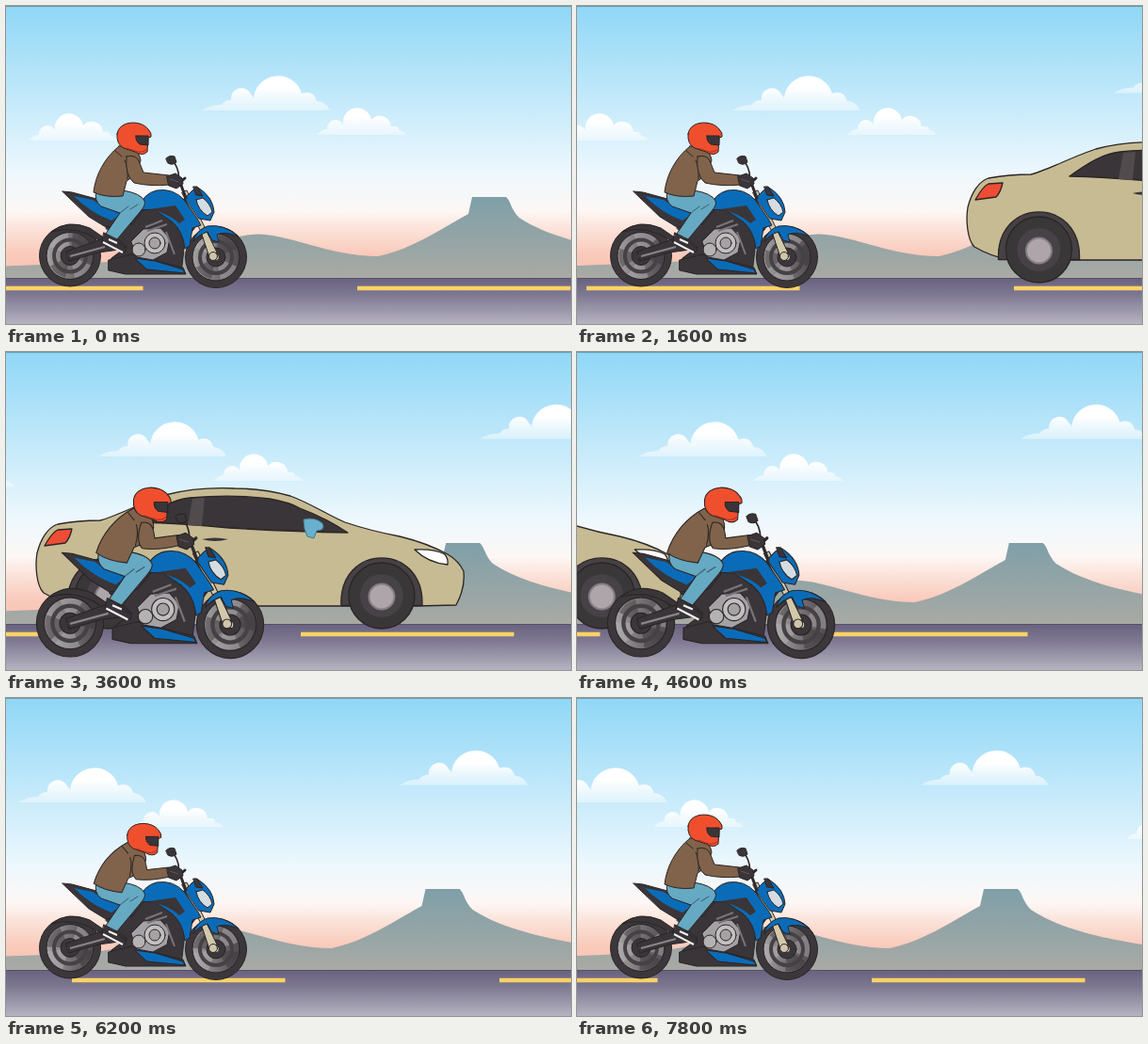
Write an HTML page that moves like this. It is 600 px wide and 338 px high and loops after 8 s.

```html
<!DOCTYPE html>
<html lang="en">
<head>
<meta charset="utf-8">
<title>Overtaking</title>
<style>
html, body { margin: 0; width: 100%; height: 100%; overflow: hidden; }
svg { display: block; width: 100vw; height: 100vh; }
.ln { stroke: #2b2526; stroke-width: 1; stroke-linejoin: round; stroke-linecap: round; }
#car .ln { stroke-width: 1.3; }
.dk { fill: #3a3538; }
.bl { fill: #0a6cb9; }
.gy { fill: #a5a2a5; }
.br { fill: #80634a; }
.no { fill: none; }
</style>
</head>
<body>
<svg viewBox="0 0 600 338" preserveAspectRatio="none">
<defs>
  <linearGradient id="sky" x2="0" y2="1">
    <stop offset="0" stop-color="#8fd7f6"/>
    <stop offset=".3" stop-color="#bde7fa"/>
    <stop offset=".62" stop-color="#eef8fd"/>
    <stop offset=".75" stop-color="#fdf7f5"/>
    <stop offset=".83" stop-color="#fbdfd5"/>
    <stop offset=".91" stop-color="#f9cabb"/>
    <stop offset="1" stop-color="#f8c0af"/>
  </linearGradient>
  <linearGradient id="hill" gradientUnits="userSpaceOnUse" x1="0" y1="203" x2="0" y2="290">
    <stop offset="0" stop-color="#7f9fa8"/>
    <stop offset="1" stop-color="#a9aaa4"/>
  </linearGradient>
  <linearGradient id="road" x2="0" y2="1">
    <stop offset="0" stop-color="#69627f"/>
    <stop offset=".35" stop-color="#7d7891"/>
    <stop offset="1" stop-color="#b7b4c2"/>
  </linearGradient>
  <linearGradient id="puff" x2="0" y2="1">
    <stop offset=".35" stop-color="#fff"/>
    <stop offset="1" stop-color="#fff" stop-opacity=".4"/>
  </linearGradient>
  <linearGradient id="rim">
    <stop offset="0" stop-color="#a3a0a2"/>
    <stop offset=".6" stop-color="#6d696c"/>
    <stop offset="1" stop-color="#4f4b4e"/>
  </linearGradient>
  <path id="big" fill="url(#puff)" d="M-81 38Q-72 32-60 32Q-57 27-50 27A11 11 0 0 1-29 21Q-27 22-26 25A26 25.500 0 0 1 25 20Q38 16 41 28Q50 28 55 38Z"/>
  <path id="small" fill="url(#puff)" d="M-43 26Q-38 20-32 20A9 9 0 0 1-15 15A15 15 0 0 1 15 10A12 12 0 0 1 36 17Q44 16 44 21Q50 22 52 26Z"/>
</defs>
<rect width="600" height="290" fill="url(#sky)"/>
<rect width="600" height="1" fill="#6c9db3"/>
<g id="clouds">
  <use href="#big" x="289" y="73"/>
  <use href="#big" x="694" y="54.500"/>
  <use href="#small" x="373" y="111"/>
  <use href="#small" x="67" y="117"/>
  <use href="#small" x="875" y="124"/>
</g>
<path id="hills" fill="url(#hill)" d="M-10 277C50 274 85 274 140 270C200 265 235 243 268 242.500C305 244 345 266 395 266C430 259 462 237 491 221L495 203H531C536 207 536 216 545 225C575 245 620 255 663 262Q710 268 760 270V291H-10Z"/>
<rect y="289.500" width="600" height="49" fill="url(#road)"/>
<rect y="289" width="600" height="1" fill="#57516a"/>
<path id="dashes" stroke="#fbd266" stroke-width="4.600" stroke-dasharray="226.500 227.500" d="M0 300H1400"/>
<g id="car"></g>
<g id="bike"></g>
</svg>
<script>
const $ = id => document.getElementById(id);
const LOOP = 8000, STEP = 200, PERIOD = 454;

const path = (cls, d, more = '') => `<path class="${cls}" d="${d}" ${more}/>`;
const disc = (x, y, r, fill, more = '') => `<circle cx="${x}" cy="${y}" r="${r}" fill="${fill}" ${more}/>`;

function carWheel(x) {
  return path('ln', `M${x - 43} 269.500C${x - 46} 202 ${x + 46} 202 ${x + 43} 269.500Z`, 'fill="#464144"') +
    disc(x, 259, 35, '#3a3739', 'class="ln"') + disc(x, 259, 23, '#464245') +
    disc(x, 260, 13.5, '#ada5aa', 'stroke="#857e82" stroke-width="2"');
}

$('car').innerHTML =
  path('ln', 'M1 214C5 198 13 186 23 183Q45 179 68 179C84 175 115 159 137 152C160 146 188 144 211 145C233 145 252 148 270 153C292 161 309 173 328 181Q355 190 386 196Q415 203 437 215Q449 222 454 233Q456 251 446 269L403 270H46Q25 266 8 256C0 248-1 226 1 214Z', 'fill="#c7bb93"') +
  path('dk ln', 'M109 181C130 166 145 157 163 155C195 152 225 153 248 156Q270 160 280 166Q309 177 331 192Q270 191 205 187Q155 182 109 181Z') +
  path('', 'M166 156L179 155L176 185L161 184Z', 'fill="#514b4e"') +
  path('dk', 'M176 199Q190 196 204 199Q190 203 176 199Z') +
  path('ln', 'M9 206C14 197 18 191 23 189L38 188Q36 198 31 203Z', 'fill="#ee4d35"') +
  path('ln', 'M402 210Q423 209 434 215Q438 220 437 226Q416 224 402 210Z', 'fill="#fff"') +
  path('', 'M284 178Q296 175 304 182Q308 189 298 190L295 198L288 196Q284 188 284 178Z', 'fill="#68b0cd" stroke="#45798d"') +
  carWheel(76.5) + carWheel(367);

function bikeWheel(x, y) {
  return disc(x, y, 32.5, '#3b373a', 'class="ln"') +
    disc(x, y, 25, 'url(#rim)', 'stroke="#282425"') +
    `<g class="spin" data-x="${x}" data-y="${y}">` +
    path('', 'M0 0L-22-10A24 24 0 0 1-2-24ZM0 0L22 10A24 24 0 0 1 5 23.500Z', 'fill="#b9b6b8" opacity=".45"') +
    path('', 'M0 0L3-24A24 24 0 0 1 22-9ZM0 0L-5 23A24 24 0 0 1-21 11Z', 'fill="#353134" opacity=".45"') + '</g>' +
    disc(x, y, 17, 'none', 'stroke="#454144" stroke-width="4"') +
    disc(x, y, 10, '#3a3639', 'class="ln"') + disc(x, y, 3.5, '#d9d6d6', 'class="ln"');
}

const machine =
  bikeWheel(68, 265.5) + bikeWheel(223, 267) +
  // chassis and swingarm
  path('dk ln', 'M48 240Q65 226 89 236L105 247L100 250Q75 232 48 240Z') +
  path('dk ln', 'M64 261L104 247L128 247V258L98 262L67 271Z') +
  path('no', 'M68 266L105 256', 'stroke="#89868a" stroke-width="2"') +
  path('dk ln', 'M106 236L122 214L190 205L201 235L190 250L186 284L124 284L109 280L112 268L128 256Z') +
  // tail and seat
  path('dk ln', 'M60 197L70 198L96 205L150 212L134 232L106 235L88 224Z') +
  path('bl', 'M72 202L92 206Q102 214 122 221L112 228Q90 220 72 202Z') +
  // belly pan
  path('dk ln', 'M109 270L133 264L188 278L191 285H127L109 281Z') +
  path('bl ln', 'M137 268L158 271L188 280L190 284L150 280Z') +
  // engine
  path('gy ln', 'M133 250L146 237L164 236L174 247L171 262L156 270L139 267Z') +
  disc(158, 252, 11, '#c2bfc1', 'class="ln"') + disc(158, 252, 6, '#a5a1a4', 'class="ln"') +
  disc(141, 259, 7, '#b5b2b4', 'class="ln"') +
  path('no', 'M148 235L166 228M150 239L171 232M170 240L179 264', 'stroke="#77747a" stroke-width="2"') +
  // fork and front fender
  path('ln', 'M187 198L192 196L224 262L216 267L207 240Z', 'fill="#d2c9ac"') +
  path('bl ln', 'M199 250Q202 238 214 234Q231 231 247 245Q232 239 224 243L226 251L219 249L214 240Q205 243 199 250Z') +
  disc(220, 266, 4.5, '#cfc6aa', 'class="ln"') +
  // tank and fairing
  path('bl ln', 'M140 216Q146 199 160 196Q178 193 190 207L203 226L207 233L198 236L195 255L190 258Q188 239 176 229L158 217Z') +
  path('dk', 'M152 216L180 212L190 227L184 231Q174 221 152 216Z') +
  // headlight
  path('bl ln', 'M190 204L198 196L204 193Q220 203 221 219L217 228L205 226Z') +
  path('ln', 'M202 206L209 204Q217 210 219 219L214 223Q204 217 202 206Z', 'fill="#d5dce2"') +
  path('dk ln', 'M199 192L203 192L209 202L202 201Z') +
  // handlebar and mirror
  path('no', 'M180 192L190 183M185 188L191 204', 'stroke="#2f2a2c" stroke-width="3" stroke-linecap="round"') +
  path('no', 'M183 188Q185 176 179 167', 'stroke="#2f2a2c" stroke-width="1.600"') +
  path('dk ln', 'M170 162Q174 158 179 160L181 166Q177 170 172 167Z');

const legs =
  path('ln', 'M104 241L111 245L127 257Q129 262 123 262L102 251Z', 'fill="#383336"') +
  path('no', 'M103 251L124 262M109 248L118 252', 'stroke="#f3f3f3" stroke-width="2"') +
  path('ln', 'M96 196L124 196Q143 199 147 207Q149 211 143 218L118 248L106 242L121 220L101 213Q93 207 96 196Z', 'fill="#65a9c3"') +
  path('ln no', 'M121 220L130 213M140 211L132 216', 'opacity=".6"');

const torso =
  path('br ln', 'M120 149L134 150Q142 156 143 164L137 180L128 186L124 202Q106 204 93 198C95 180 104 162 120 149Z') +
  path('ln no', 'M126 164Q130 171 129 184M131 162L136 174M116 154L123 160');

const head =
  path('ln', 'M118 136C120 121 144 121 151 131Q155 135 154 139L151 140L150 155Q145 160 137 155L125 151Q117 147 118 136Z', 'fill="#f04f2e"') +
  path('dk ln', 'M138 138L151 138L151 148L142 147Q137 143 138 138Z') +
  path('no', 'M128 151L137 154Q144 157 150 152', 'stroke="#a9321e"');

$('bike').innerHTML = machine + legs +
  `<g id="torso">${torso}</g><g id="head">${head}</g><path id="arm" class="br ln"/>` +
  path('dk ln', 'M171 181L180 178L187 183L188 189L181 194L173 191Z') +
  path('no', 'M174 184L183 187', 'stroke="#5d5659"');

// Value at t between [time, value] pairs
function track(keys, t, ease = k => k) {
  let i = 1;
  while (i < keys.length - 1 && t > keys[i][0]) i++;
  const [t0, a] = keys[i - 1], [t1, b] = keys[i];
  const k = Math.min(1, Math.max(0, (t - t0) / (t1 - t0)));
  return a + (b - a) * ease(k);
}
const smooth = k => k * k * (3 - 2 * k);

const ROAD = [[0, 0], [1.6, 1271], [2.4, 2058], [3.6, 3238], [4.6, 4207], [6.2, 5751], [7.8, 7324], [8, 7520]];
const SIZE = [[0, 1], [1.65, 1], [2.25, 1.115], [2.45, 1.115], [3.1, 1.097], [4.9, 1.097], [5.2, 1.112], [5.9, 1], [8, 1]];
const LEAN = [[0, 0], [2.1, 0], [3.2, 1], [6.05, 1], [7, 0], [8, 0]];

const carX = t => 414 - 143.75 * (t - 1.6) - 39.4 * (t - 1.6) * (t - 2.4) - 9.6 * (t - 1.6) * (t - 2.4) * (t - 3.6);
const place = (id, value) => $(id).setAttribute('transform', value);
const shift = (id, x, y = 0) => place(id, `translate(${x.toFixed(2)} ${y.toFixed(2)})`);

function armPath(k) {
  const p = (x, y, dx, dy) => `${(x + dx * k).toFixed(1)} ${(y + dy * k).toFixed(1)}`;
  return `M${p(128, 160, 9, 8)}Q${p(139, 157, 8, 9)} ${p(142, 167, 7, 10)}L${p(146, 177, 4, 6)}` +
    `L173 180L174 190Q${p(153, 192, 0, 3)} ${p(136, 188, 2, 5)}Q${p(126, 180, 5, 6)} ${p(128, 160, 9, 8)}Z`;
}

function draw(t) {
  const dist = track(ROAD, t);
  shift('clouds', -dist * 0.0339);
  shift('hills', -dist * 0.0086);
  shift('dashes', -((dist + 81) % PERIOD));
  shift('car', carX(t));

  const s = track(SIZE, t, smooth), lean = track(LEAN, t, smooth);
  const rearX = 68 - Math.max(0, s - 1.097) * 111, rearY = 266 + (s - 1) * 236;
  place('bike', `translate(${rearX} ${rearY}) scale(${s}) translate(-68 -266)`);
  place('torso', `translate(0 ${lean * 2}) rotate(${lean * 11} 108 198)`);
  shift('head', lean * 11.5, lean * 10);
  $('arm').setAttribute('d', armPath(lean));

  const turn = dist / 33 * 180 / Math.PI % 360;
  for (const w of document.querySelectorAll('.spin')) {
    w.setAttribute('transform', `translate(${w.dataset.x} ${w.dataset.y}) rotate(${turn})`);
  }
}

function tick() {
  const ms = performance.now() % LOOP;
  draw(Math.floor(ms / STEP) * STEP / 1000);
  requestAnimationFrame(tick);
}
tick();
</script>
</body>
</html>
```
